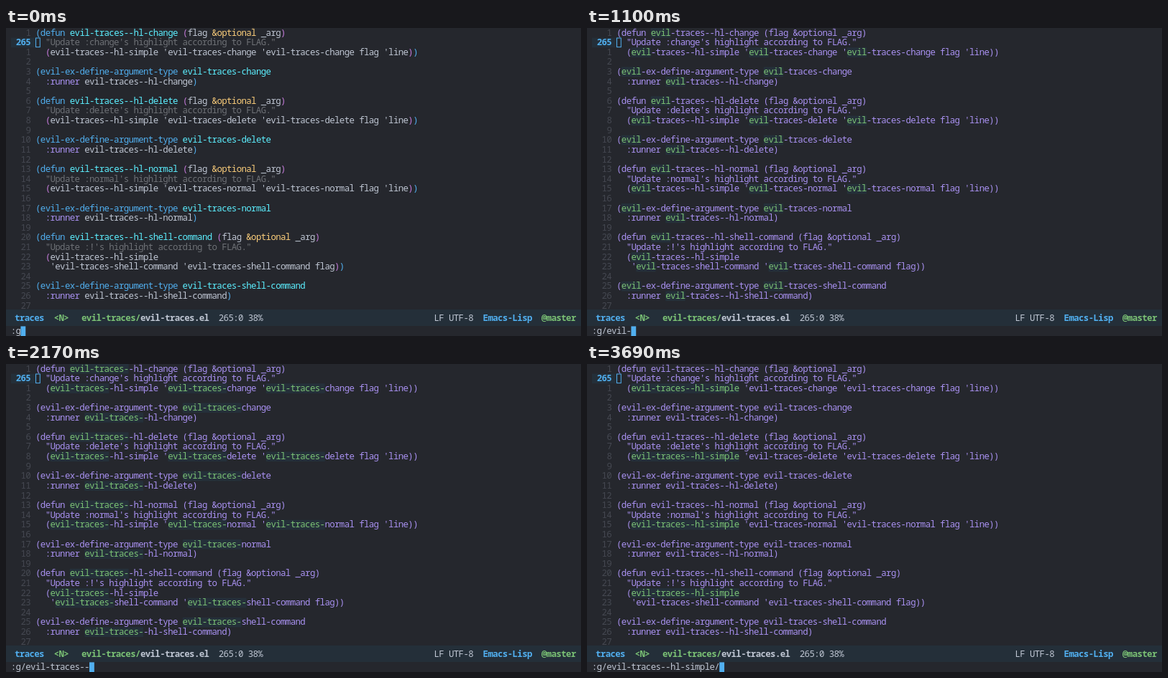
These frames come from a looping animation (800 px wide and 430 px high, 4690 ms). An HTML page:

```html
<!DOCTYPE html>
<html lang="en">
<head>
<meta charset="utf-8">
<title>Live preview of a global command</title>
<style>
  html, body { margin: 0; width: 100%; height: 100%; overflow: hidden; background: #25272d; }
  svg { display: block; }
  text {
    font: 500 12.4px "Noto Sans Mono", "DejaVu Sans Mono", monospace;
    font-stretch: condensed;
    letter-spacing: -0.615px;
    font-variant-ligatures: none;
    white-space: pre;
  }
  .bold { font-weight: 700; }
</style>
</head>
<body>
<svg id="stage" width="800" height="430" viewBox="0 0 800 430"></svg>
<script>
const LOOP = 4690;
const CELL = 6.825, ROW = 13.61, BASE = 10.6, LEFT = 41;
const C = {
  bg: '#25272d', bar: '#242f39', match: '#25303a', fg: '#bfc6d3', dim: '#454851', doc: '#6e7176',
  blue: '#51afef', cyan: '#5cefff', yellow: '#fcce7b', violet: '#a991f1', magenta: '#c57bdb', green: '#7bc275'
};

const COMMAND = ':g/evil-traces--hl-simple/';
const PATTERN = COMMAND.slice(3, -1);

// [start ms, typed characters, matched pattern length (-1: preview off)]
const STEPS = [
  [0, 2, -1], [280, 3, 0], [440, 4, 0], [630, 5, 1], [710, 6, 1],
  [1000, 7, 3], [1100, 8, 4], [1320, 10, 6], [1390, 11, 6],
  [1660, 12, 8], [1750, 13, 9], [1840, 14, 10], [2030, 15, 11], [2170, 16, 12],
  [2420, 17, 13], [2490, 18, 14], [2720, 18, 15],
  [2870, 19, 15], [2970, 20, 16], [3070, 21, 18], [3240, 22, 19],
  [3390, 24, 21], [3690, 26, 22]
];

function block(name, label = name, split = false) {
  const face = `'evil-traces-${name}`;
  const call = '  (evil-traces--hl-simple';
  return [
    `(defun evil-traces--hl-${name} (flag &optional _arg)`,
    `  "Update :${label}'s highlight according to FLAG."`,
    ...(split ? [call, `   ${face} ${face} flag))`] : [`${call} ${face} ${face} flag 'line))`]),
    '',
    `(evil-ex-define-argument-type evil-traces-${name}`,
    `  :runner evil-traces--hl-${name})`,
    ''
  ];
}
const LINES = [
  ...block('change'), ...block('delete'), ...block('normal'),
  ...block('shell-command', '!', true)
];

const escapeText = s => s.replace(/&/g, '&amp;').replace(/</g, '&lt;');
const span = (s, fill) => `<tspan fill="${fill}">${escapeText(s)}</tspan>`;
const text = (x, y, s, fill, cls = '') =>
  `<text x="${x}" y="${y}" fill="${fill}" class="${cls}">${escapeText(s)}</text>`;
const rect = (x, y, w, h, fill) =>
  `<rect x="${x}" y="${y}" width="${w}" height="${h}" fill="${fill}"/>`;

function syntaxLines() {
  let depth = 0, naming = false;
  const paint = token => {
    if (token === '(') return depth++ ? C.magenta : C.blue;
    if (token === ')') return --depth ? C.magenta : C.blue;
    if (token[0] === '"') return C.doc;
    if (token === '&optional') return C.yellow;
    if (token[0] === ':') return C.violet;
    if (/^(defun|evil-ex-define)/.test(token)) { naming = true; return C.blue; }
    if (naming && token.trim()) { naming = false; return C.cyan; }
    return C.fg;
  };
  return LINES.map(line =>
    (line.match(/"[^"]*"|[()]|\s+|[^\s()]+/g) || []).map(t => span(t, paint(t))).join(''));
}
const SYNTAX = syntaxLines();

function previewLine(line, pattern, top) {
  if (!pattern) return { marks: '', body: span(line, C.violet) };
  let marks = '', body = '', col = 0;
  line.split(pattern).forEach((part, i) => {
    if (i) {
      marks += rect(LEFT + col * CELL, top, pattern.length * CELL, ROW, C.match);
      body += span(pattern, C.green);
      col += pattern.length;
    }
    if (part) body += span(part, C.violet);
    col += part.length;
  });
  return { marks, body };
}

function buffer(matched) {
  const pattern = PATTERN.slice(0, Math.max(matched, 0));
  const rows = LINES.map((line, i) => {
    const top = i * ROW, y = top + BASE;
    const current = i === 1;
    const label = String(current ? 265 : Math.abs(i - 1));
    const { marks, body } = matched < 0
      ? { marks: '', body: SYNTAX[i] }
      : previewLine(line, pattern, top);
    return marks
      + text(34.2 - label.length * CELL, y, label, current ? C.blue : C.dim, current ? 'bold' : '')
      + `<text x="${LEFT}" y="${y}">${body}</text>`;
  }).join('');
  const currentLabel = rect(7, ROW, 34, ROW, C.bar);
  const cursor = `<rect x="41.5" y="14" width="5.8" height="12.6" fill="none" stroke="${C.blue}"/>`;
  return currentLabel + rows + cursor;
}

const STATUS = rect(0, 393, 800, 23, C.bar) + [
  [12, 'traces', C.blue, 'bold'],
  [66.6, '<N>', C.green, 'bold'],
  [105, 'evil-traces/', C.green, 'bold'],
  [186.9, 'evil-traces.el', C.fg, 'bold'],
  [295.8, '265:0 38%', C.fg, ''],
  [595.5, 'LF UTF-8', C.fg, ''],
  [663.6, 'Emacs-Lisp', C.blue, 'bold'],
  [745, '@master', C.green, 'bold']
].map(([x, s, fill, cls]) => text(x, 409.1, s, fill, cls)).join('');

const prompt = typed => text(6.8, 426.7, COMMAND.slice(0, typed), C.fg)
  + rect(6.8 + typed * CELL, 416.4, CELL, 13.6, C.blue);

const stage = document.getElementById('stage');
let shown = null;

function render(ms) {
  const step = STEPS.findLast(([start]) => start <= ms);
  if (step === shown) return;
  shown = step;
  const [, typed, matched] = step;
  stage.innerHTML = rect(0, 0, 800, 430, C.bg) + buffer(matched) + STATUS + prompt(typed);
}

const origin = performance.now();
function tick() {
  render((performance.now() - origin) % LOOP);
  requestAnimationFrame(tick);
}
tick();
</script>
</body>
</html>
```
